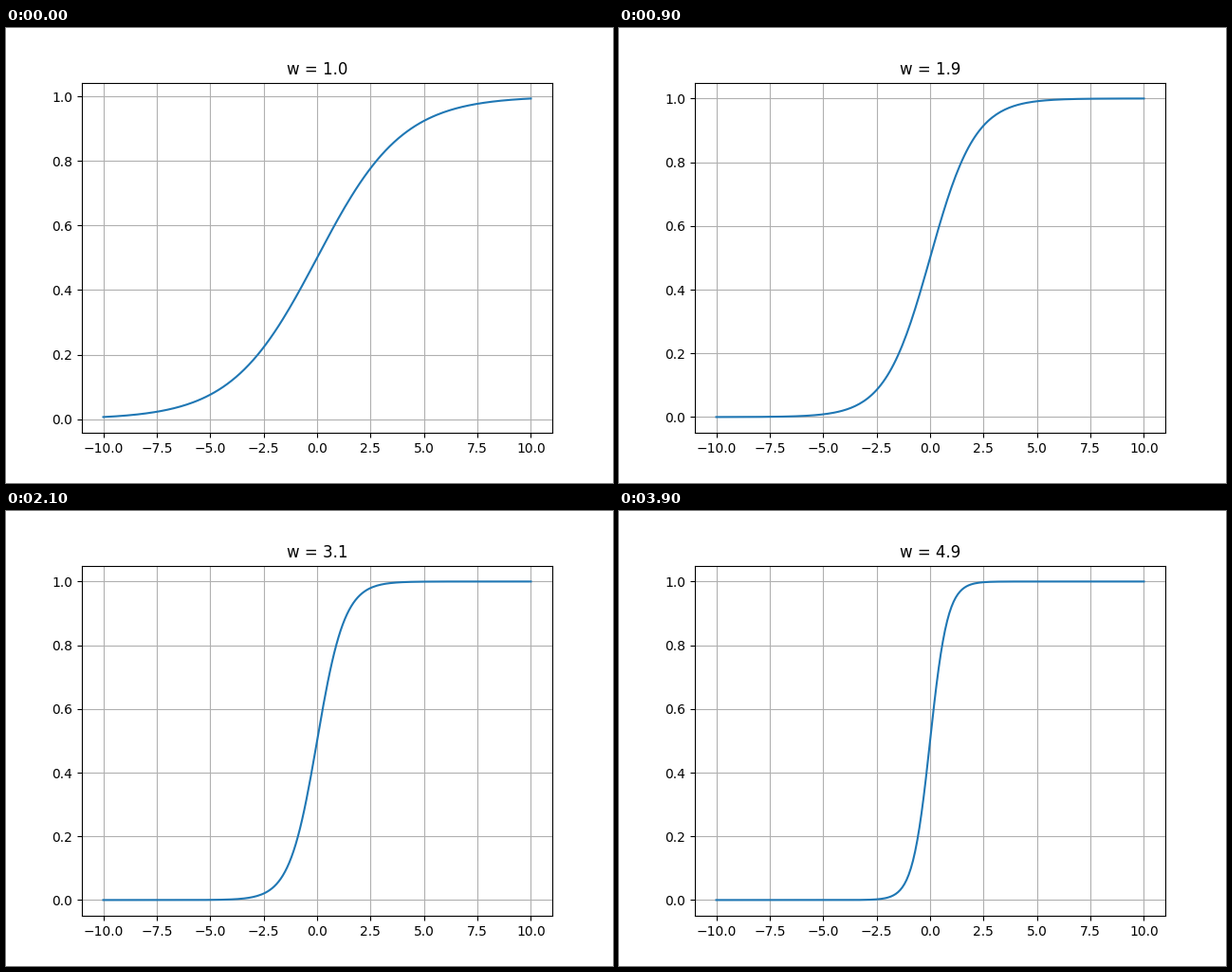
These frames come from a looping animation (640x480 px, 4000 ms). A matplotlib script:

```python
import numpy as np
import matplotlib.pyplot as plt
from matplotlib.animation import FuncAnimation

FRAMES = 40
INTERVAL = 100

x = np.linspace(-10, 10, 201)


def sigmoid(z):
    return 1 / (1 + np.exp(-z))


fig, ax = plt.subplots(figsize=(6.4, 4.8), dpi=100)
line, = ax.plot(x, sigmoid(x / 2), lw=1.5, color="#1f77b4")
title = ax.set_title("w = 1.0")
ax.grid(True)


def draw(i):
    w = 1 + i / 10
    line.set_ydata(sigmoid(w * x / 2))
    title.set_text(f"w = {w:.1f}")
    # The y range follows the curve's own limits.
    ax.relim()
    ax.autoscale_view()
    return line, title


anim = FuncAnimation(fig, draw, frames=FRAMES, interval=INTERVAL,
                     repeat=True, repeat_delay=0)
plt.show()
```
